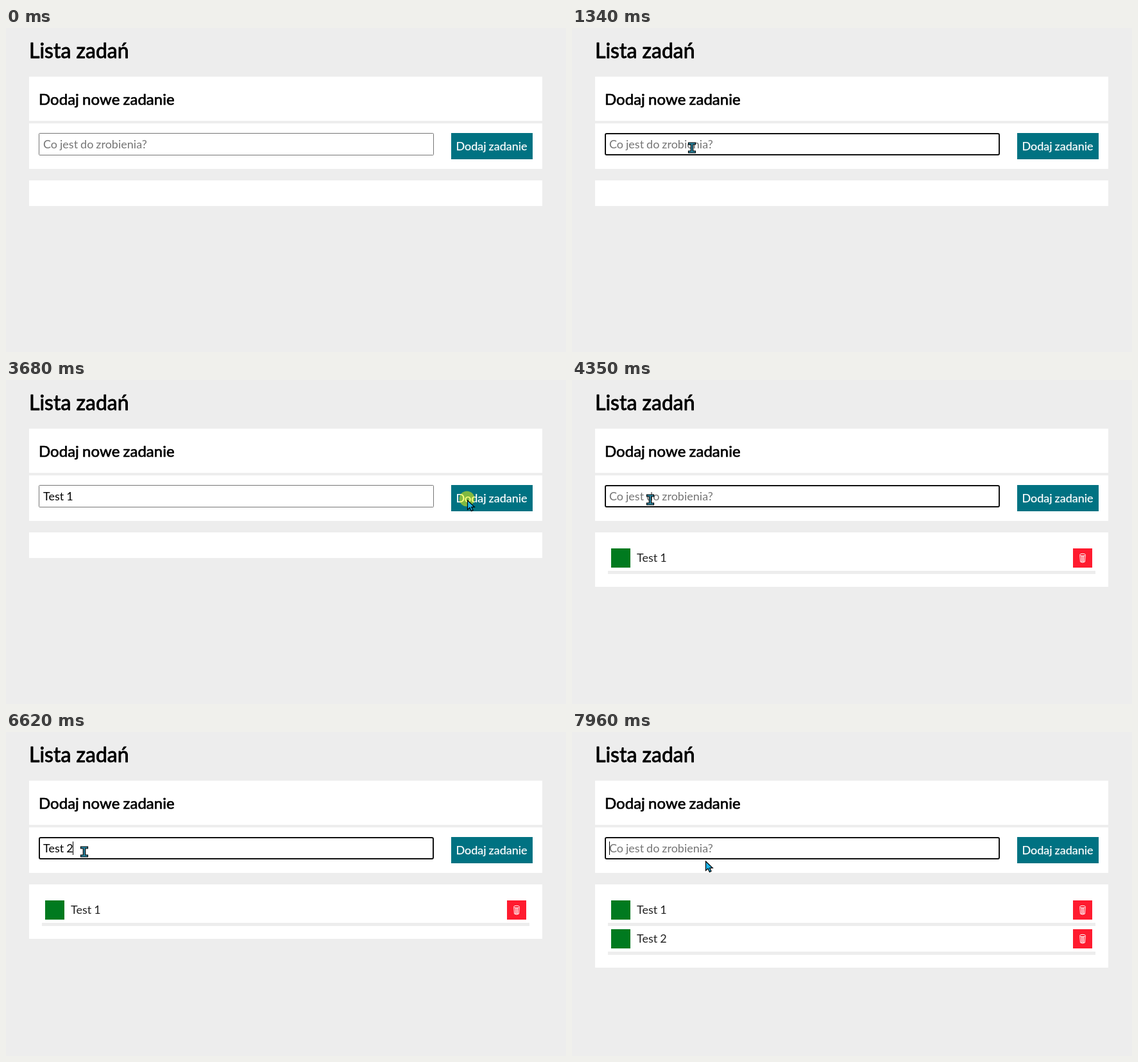
These frames come from a looping animation (873x506 px, 8 s). An HTML page with a canvas:

```html
<!DOCTYPE html>
<html lang="pl">
<head>
<meta charset="utf-8">
<title>Lista zadań</title>
<style>
html, body { margin: 0; width: 100%; height: 100%; overflow: hidden; background: #ededed; }
canvas { display: block; }
</style>
</head>
<body>
<canvas id="stage" width="873" height="506"></canvas>
<script>
const ctx = document.getElementById('stage').getContext('2d');
const LOOP = 8000, STEP = 66.9, BLINK = 535, CLICK = 70;
const GREY = '#ededed', TEAL = '#007282';

// Each round: the field gains focus, the name is typed, the button is clicked.
const rounds = [
  { focus: 800, name: 'Test 1', keys: [1740, 2070, 2210, 2270, 2740, 2870], click: 3680 },
  { focus: 3750, name: 'Test 2', keys: [5150, 5550, 5680, 5750, 6620, 6620], click: 7490 },
  { focus: 7560, name: '', keys: [], click: Infinity }
];
const clicks = [800, 3680, 4550, 7490];

// Pointer moves: each starts where the last one ended and bends towards a point.
const entry = [752, 488];
const moves = [
  { start: 60, end: 600, bend: [185, -145], to: [187, 187] },
  { start: 2900, end: 3610, bend: [450, 180], to: [719, 187] },
  { start: 3750, end: 4345, bend: [-40, 420], to: [122, 187] },
  { start: 6690, end: 6955, bend: [500, 178], to: [850, 200] },
  { start: 7160, end: 7430, bend: [790, 188], to: [741, 182] },
  { start: 7560, end: 7960, bend: [380, 225], to: [208, 201] }
];

function rect(x, y, w, h, color) {
  ctx.fillStyle = color;
  ctx.fillRect(x, y, w, h);
}

function text(str, x, y, { size = 18, color = '#000', bold = 0, space = -0.035 } = {}) {
  ctx.font = `400 ${size}px Lato, sans-serif`;
  ctx.wordSpacing = `${space * size}px`;
  ctx.fillStyle = ctx.strokeStyle = color;
  ctx.fillText(str, x, y);
  if (bold) {
    ctx.lineWidth = bold;
    ctx.lineJoin = 'round';
    ctx.strokeText(str, x, y);
  }
}

function drawInput(t) {
  const { focus, name, keys, click } = rounds.find(r => t < r.click + CLICK);
  const typed = keys.filter(k => k <= t);
  const value = name.slice(0, typed.length);
  const focused = t >= focus && t < click;
  const w = focused ? 2 : 1;
  ctx.beginPath();
  ctx.roundRect(51 + w / 2, 164 + w / 2, 616 - w, 35 - w, w);
  ctx.strokeStyle = focused ? '#101010' : '#767676';
  ctx.lineWidth = w;
  ctx.stroke();
  if (value) text(value, 58, 188);
  else text('Co jest do zrobienia?', 58, 188, { color: '#757575' });
  const since = typed.pop() ?? focus;
  if (focused && (t - since) % (2 * BLINK) < BLINK) {
    rect(Math.floor(58 + ctx.measureText(value).width), 171, 1, 21, '#000');
  }
}

function drawBin(x, y) {
  ctx.strokeStyle = '#fff';
  ctx.lineWidth = 1;
  ctx.beginPath();
  ctx.ellipse(x, y - 5, 4.5, 1.7, 0, 0, 7);
  ctx.moveTo(x - 4.2, y - 4);
  ctx.lineTo(x - 3.4, y + 6);
  ctx.quadraticCurveTo(x, y + 8, x + 3.4, y + 6);
  ctx.lineTo(x + 4.2, y - 4);
  for (const d of [-1.6, 0, 1.6]) {
    ctx.moveTo(x + d * 1.1, y - 3);
    ctx.lineTo(x + d, y + 6.5);
  }
  ctx.stroke();
}

function drawTasks(t) {
  const done = rounds.filter(r => t >= r.click + CLICK);
  rect(36, 238, 800, 40 + 45 * done.length, '#fff');
  done.forEach(({ name }, i) => {
    const y = 263 + 45 * i;
    rect(61, y, 30, 30, '#007a1f');
    text(name, 101, y + 21, { color: '#222' });
    rect(781, y, 30, 30, '#ff1b2f');
    drawBin(796, y + 15);
    rect(56, y + 35, 760, 5, GREY);
  });
}

function pointerAt(t) {
  let from = entry;
  for (const { start, end, bend, to } of moves) {
    if (t < start) break;
    const k = Math.min(1, (t - start) / (end - start));
    const u = (1 - Math.cos(Math.PI * k)) / 2, v = 1 - u;
    from = from.map((p, i) => Math.round(v * v * p + 2 * u * v * bend[i] + u * u * to[i]));
  }
  return from;
}

function shape(points, fill) {
  ctx.beginPath();
  points.forEach(([x, y]) => ctx.lineTo(x, y));
  ctx.closePath();
  ctx.fillStyle = fill;
  ctx.fill();
  ctx.strokeStyle = '#000';
  ctx.lineWidth = 1.2;
  ctx.lineJoin = 'miter';
  ctx.stroke();
}

function drawArrow() {
  shape([[0.5, 1], [0.5, 15.5], [4, 12.3], [6.4, 17.6], [9, 16.5], [6.7, 11.3], [11.3, 11.3]], '#1db4e8');
}

function drawBeam() {
  const right = [[1.7, -5], [5.5, -5], [5.5, -8]];
  const top = [...right, ...right.map(([x, y]) => [-x, y]).reverse()];
  shape([...top, ...top.map(([x, y]) => [-x, -y])], '#2b87a3');
}

function drawPointer(t) {
  const tick = Math.floor((t + 5) / STEP) * STEP;
  if (tick < moves[0].start) return;
  const [x, y] = pointerAt(tick);
  if (clicks.some(c => t >= c && t < c + CLICK)) {
    ctx.beginPath();
    ctx.arc(x - 0.5, y - 1.5, 12, 0, 7);
    ctx.fillStyle = 'rgba(255, 255, 0, .5)';
    ctx.fill();
  }
  const inField = x > 51 && x < 667 && y > 164 && y < 199;
  ctx.save();
  ctx.translate(x, y);
  inField ? drawBeam() : drawArrow();
  ctx.restore();
}

function draw(t) {
  rect(0, 0, 873, 506, GREY);
  text('Lista zadań', 36, 47, { size: 32, bold: 0.9, space: 0 });
  rect(36, 76, 800, 69, '#fff');
  text('Dodaj nowe zadanie', 51, 120, { size: 24, bold: 0.7 });
  rect(36, 149, 800, 71, '#fff');
  drawInput(t);
  rect(694, 164, 127, 41, TEAL);
  text('Dodaj zadanie', 701.5, 191, { color: '#fff', bold: 0.25 });
  drawTasks(t);
  drawPointer(t);
}

const start = performance.now();
function loop() {
  draw((performance.now() - start) % LOOP);
  requestAnimationFrame(loop);
}
loop();
</script>
</body>
</html>
```
